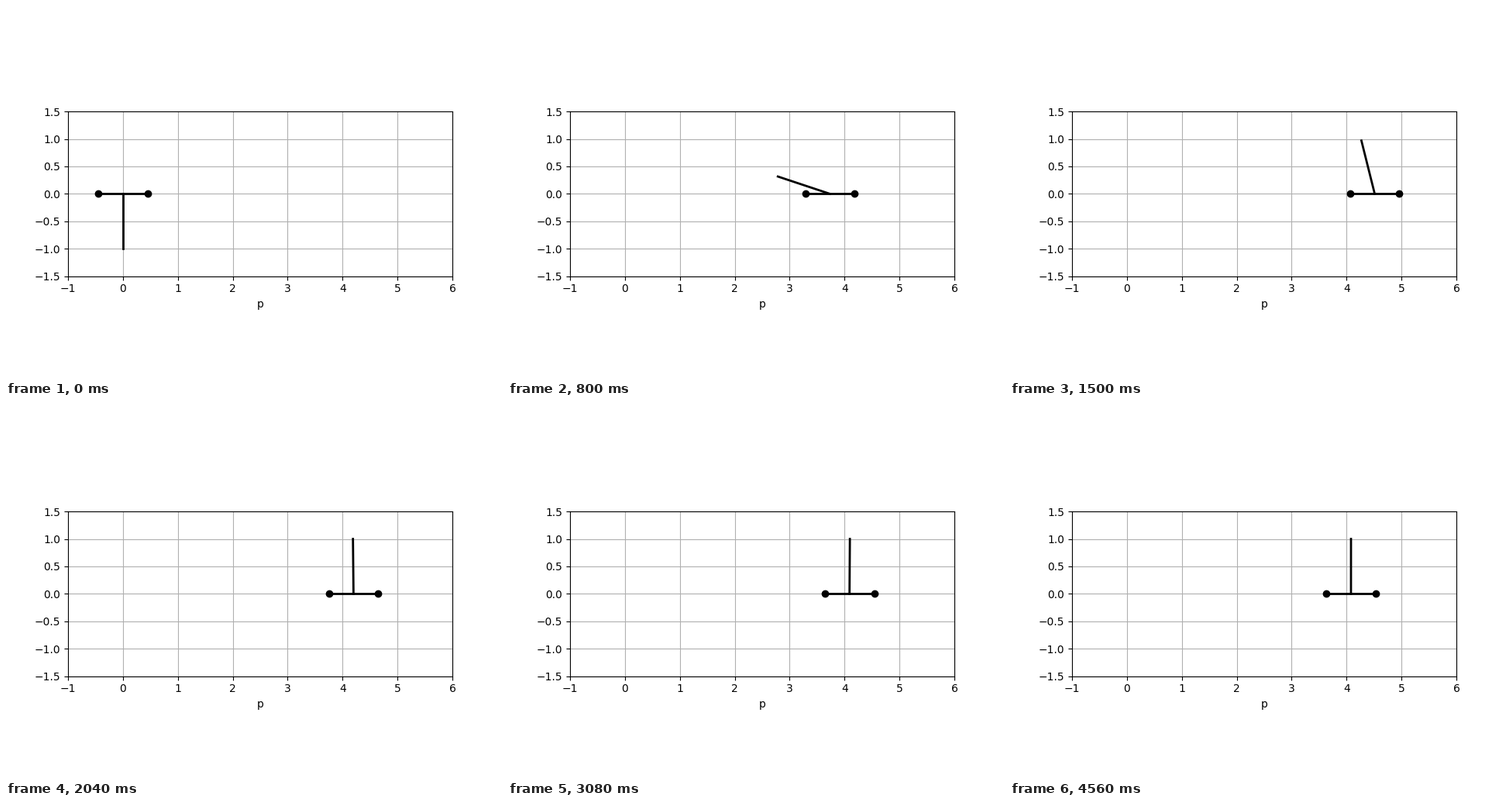
Animation, 640 px wide and 480 px high, one loop 5.02 s. Source, as a matplotlib script:

```python
import numpy as np
import matplotlib.pyplot as plt
from matplotlib.animation import FuncAnimation

STEP_MS = 20
FRAMES = 251
HALF_CART = 0.45
POLE = 1.0

# A pose is (cart position, pole angle); angle 0 hangs down, pi stands upright.
PUSH_START, PUSH_END = 0.02, 0.56
CATCH, SETTLE = 1.10, 1.50
CATCH_POSE = np.array([4.741, 2.333])
CATCH_SPEED = np.array([0.99, 1.40])
REST = np.array([4.0799, np.pi])
DECAY = 2.5


def push(t):
    """The cart speeds up and the pole swings out behind it."""
    u = max(t - PUSH_START, 0)
    return np.array([6.94 * u ** 1.9, 1 - np.cos(3.47 * u)])


def settle(t):
    """Damped approach to the upright rest pose."""
    u = t - SETTLE
    offset = np.array([0.4326 + 0.0508 * u, -0.245 + 0.382 * u])
    return REST + offset * np.exp(-DECAY * u)


def speed(motion, t, d=1e-4):
    return (motion(t + d) - motion(t - d)) / (2 * d)


def glide(t, t0, t1, x0, v0, x1, v1):
    """Cubic from x0 to x1 that keeps the speeds at both ends."""
    h = t1 - t0
    s = (t - t0) / h
    return ((1 + 2 * s) * (1 - s) ** 2 * x0 + s * (1 - s) ** 2 * h * v0
            + s * s * (3 - 2 * s) * x1 + s * s * (s - 1) * h * v1)


def pose(t):
    if t <= PUSH_END:
        return push(t)
    if t <= CATCH:
        return glide(t, PUSH_END, CATCH, push(PUSH_END), speed(push, PUSH_END),
                     CATCH_POSE, CATCH_SPEED)
    if t <= SETTLE:
        return glide(t, CATCH, SETTLE, CATCH_POSE, CATCH_SPEED,
                     settle(SETTLE), speed(settle, SETTLE))
    return settle(t)


fig, ax = plt.subplots(figsize=(6.4, 4.8), dpi=100)
ax.set_aspect("equal")
ax.set_xlim(-1, 6)
ax.set_ylim(-1.5, 1.5)
ax.set_xlabel("p")
ax.grid()

cart, = ax.plot([], [], "o-", color="black", lw=2)
pole, = ax.plot([], [], "-", color="black", lw=2)


def update(i):
    p, angle = pose(i * STEP_MS / 1000)
    cart.set_data([p - HALF_CART, p + HALF_CART], [0, 0])
    pole.set_data([p, p - POLE * np.sin(angle)], [0, -POLE * np.cos(angle)])
    return cart, pole


anim = FuncAnimation(fig, update, frames=FRAMES, interval=STEP_MS,
                     repeat=True, repeat_delay=0, blit=False)
plt.show()
```
